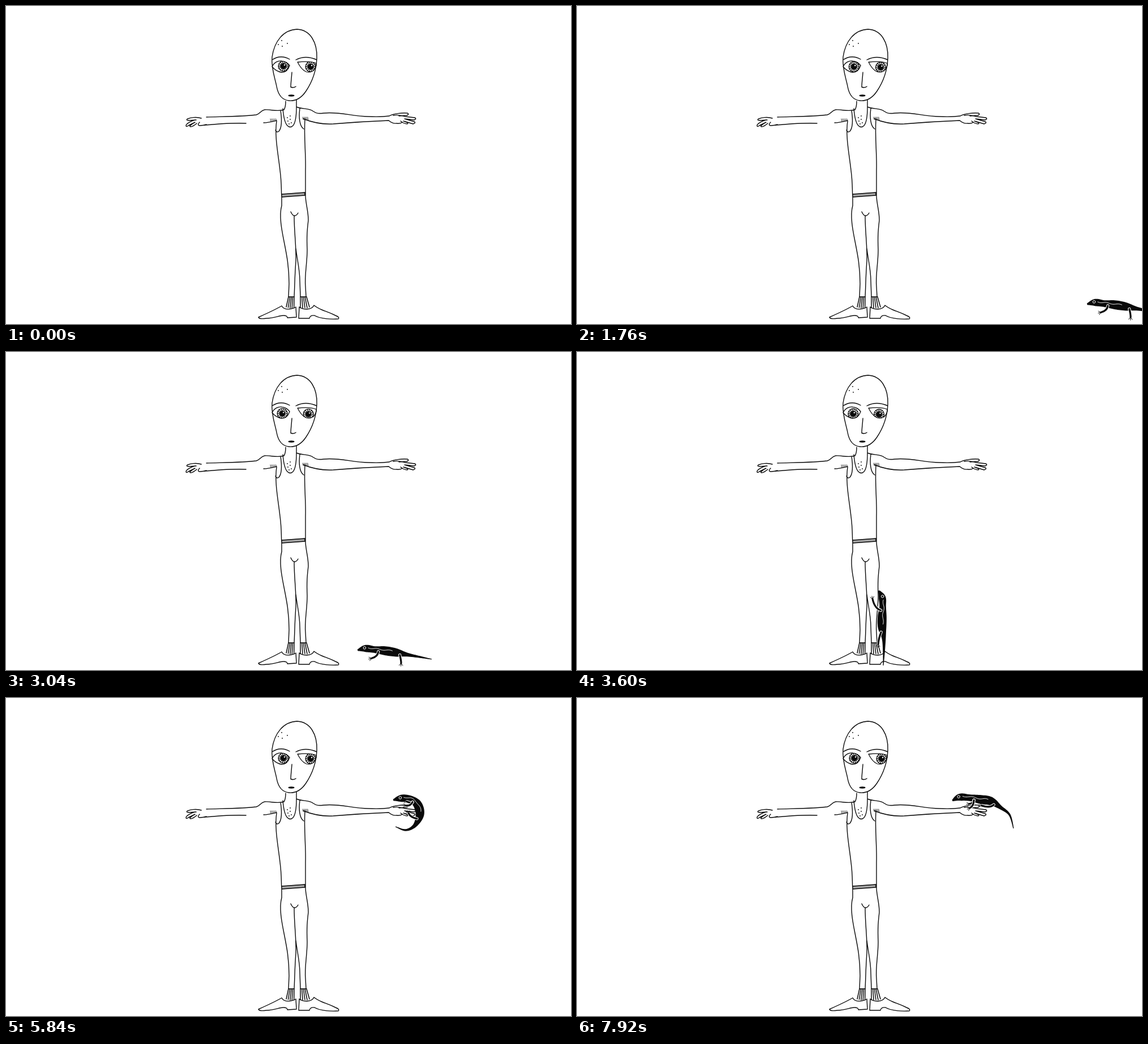
An HTML page with a canvas for the animation above (8 s loop, 998x561 px).

```html
<!DOCTYPE html>
<html lang="en">
<head>
<meta charset="utf-8">
<title>Lizard visit</title>
<style>
html, body { margin: 0; width: 100%; height: 100%; overflow: hidden; background: #fff; }
canvas { display: block; width: 100vw; height: 100vh; }
</style>
</head>
<body>
<canvas id="stage" width="998" height="561"></canvas>
<script>
const ctx = document.getElementById('stage').getContext('2d');
const LOOP = 8000, STEP = 80;
const INK = '#0a0a0a';

// ---- the man ----
const head = `M514 41C490 42 474 62 470 90C468 110 476 130 478 142C481 158 489 166 500 167
  C512 168 522 162 530 150C538 138 548 118 549 92C550 65 538 42 514 41Z
  M470 95Q485 85 501 94M512 95Q529 86 549 95
  M505 117C504 130 503 137 503 143Q508 145 512 142
  M494 168C494 175 493 180 491 183M513 166L513 178`;

const arms = `M491 183C478 187 468 182 457 183C450 184 449 190 442 192C420 195 385 195 354 196
  M478 202C470 204 463 206 455 206M424 207C400 206 372 208 342 211
  M345 198C336 195 326 197 321 199Q317 201 322 202L336 201
  M334 201C326 203 318 208 318 211Q318 214 322 211L334 205
  M334 205C328 208 322 213 326 213Q330 213 337 207M342 205Q337 210 342 211Q348 211 354 209
  M513 178C524 183 535 179 543 186C549 190 553 190 561 189C590 186 612 195 640 195Q662 196 677 194
  M525 199C540 205 560 209 578 208Q626 204 676 202`;

const rightHand = `M677 194C684 190 700 188 709 189Q713 191 708 193L694 194
  M684 193Q693 191 705 195L722 197Q726 199 721 201L704 199
  M704 199L721 204Q725 206 719 208L702 203M702 203Q712 206 709 208Q703 208 697 203
  M676 202Q683 208 690 207Q697 208 700 205`;

const torso = `M489 181C490 193 492 206 497 211Q502 216 507 211C512 205 513 193 513 178
  M485 184C487 198 488 214 482 221Q478 224 476 219
  M519 181C517 195 518 212 526 217
  M478 203C474 230 481 262 484 290C487 312 486 325 487 338
  M528 199C526 235 530 260 529 290L529 336
  M487 332L528 329L528 334L487 337Z`;

const legs = `M487 338L487 352C482 370 487 395 491 415C496 440 500 460 500 490L499 513
  M509 370C509 400 513 425 512 450C510 475 510 495 509 513
  M512 428C514 446 519 465 519 485L520 513
  M529 336C530 352 534 362 534 378C532 395 531 405 532 430C532 455 527 475 529 495L530 513
  M503 363Q506 370 510 370Q513 370 516 365`;

const shoes = `M446 549C455 545 475 536 487 529C491 537 503 536 512 531L513 549L497 550
  Q497 546 490 546C482 546 475 551 460 551Q447 553 446 549
  M518 531L517 551L536 551Q537 545 545 546C555 552 575 553 587 552
  Q590 549 582 546C570 540 565 539 558 536Q549 532 544 528C540 537 525 536 518 531`;

const lines = new Path2D([head, arms, rightHand, torso, legs, shoes].join(''));
const eyeL = new Path2D('M470 107C474 99 481 96 487 97Q496 98 501 105C498 114 493 117 487 117C480 116 474 112 470 107Z');
const eyeR = new Path2D('M515 99C524 98 538 97 548 101Q549 107 543 114Q537 118 530 116C523 113 518 105 515 99Z');

const dots = [481,68, 487,61, 497,66, 488,71, 497,197, 502,194, 498,203, 504,206, 500,208, 502,200];

function stroke(width, color, draw) {
  ctx.lineWidth = width;
  ctx.strokeStyle = color;
  ctx.beginPath();
  draw();
  ctx.stroke();
}

function seg(x1, y1, x2, y2) {
  ctx.moveTo(x1, y1);
  ctx.lineTo(x2, y2);
}

function disc(x, y, r, color) {
  ctx.fillStyle = color;
  ctx.beginPath();
  ctx.arc(x, y, r, 0, 7);
  ctx.fill();
}

function drawEye(shape, x, y) {
  ctx.save();
  ctx.clip(shape);
  stroke(1.3, INK, () => {
    ctx.arc(x, y, 9, 0, 7);
    for (let i = 0; i < 14; i++) {
      const c = Math.cos(i * Math.PI / 7), s = Math.sin(i * Math.PI / 7);
      seg(x + c * 5, y + s * 5, x + c * 9, y + s * 9);
    }
  });
  disc(x, y, 5.2, INK);
  disc(x + 2, y - 2, 1.2, '#fff');
  ctx.restore();
  ctx.lineWidth = 1.3;
  ctx.strokeStyle = INK;
  ctx.stroke(shape);
}

function drawMan(gaze) {
  ctx.lineWidth = 1.4;
  ctx.strokeStyle = INK;
  ctx.stroke(lines);
  drawEye(eyeL, 490 - gaze * 2.2, 106 + gaze * 3);
  drawEye(eyeR, 538 - gaze * 4.5, 107 + gaze * 3);
  for (let i = 0; i < dots.length; i += 2) disc(dots[i], dots[i + 1], 0.9, INK);

  ctx.fillStyle = INK;
  ctx.beginPath();
  ctx.ellipse(504, 158, 5.5, 1.7, 0, 0, 7);
  ctx.fill();

  stroke(0.8, INK, () => {
    for (let x = 489; x < 528; x += 2.2) {
      const y = 332 - (x - 487) * 0.073;
      seg(x, y, x, y + 5);
    }
    for (let i = 0; i < 5; i++) {
      seg(467 + i * 2.4, 199, 468 + i * 2.4, 204 - i * 0.3);
      seg(524 + i * 2.2, 196, 525 + i * 2.2, 200 + i * 0.4);
    }
  });
  stroke(1.5, INK, () => {
    seg(499, 513, 509, 513);
    seg(520, 513, 531, 513);
    for (let i = 0; i < 5; i++) {
      seg(499 + i * 2.5, 513, 495 + i * 3.4, 531 + Math.min(i, 2));
      seg(520 + i * 2.7, 513, 520 + i * 4, 531 + (i < 4 ? 1.5 : 0));
    }
  });
}

// ---- the lizard: spine from nose to tail tip, feet as forward/side offsets ----
const pose = (t, spine, feet, pair = 0) => ({ t, spine, feet, pair });

const runHigh = pose(0, [0,526, 14,522, 30,523, 48,524, 68,526, 88,526, 110,527, 132,528], [18, 12, -13, 15]);
const runLow = pose(0, [0,526, 14,523, 30,525, 48,527, 67,530, 88,534, 110,538, 131,542], [11, 16, -5, 17]);

const climb = [
  pose(3480, [537,468, 538,483, 541,500, 548,516, 562,525, 582,528, 606,531, 628,534], [16, 16, -8, 15]),
  pose(3600, [533,421, 539,433, 540,449, 539,467, 539,486, 542,506, 542,530, 541,553], [19, 19, -20, 12]),
  pose(4320, [538,308, 541,321, 541,337, 539,356, 540,375, 540,397, 537,420, 536,441], [22, 18, -10, 16]),
  pose(4720, [574,245, 563,260, 552,274, 547,291, 544,309, 538,329, 533,355, 535,380], [28, 18, 3, 18], 1)
];

const perch = [
  pose(5120, [711,218, 700,226, 688,235, 673,244, 655,251, 634,258, 612,266, 590,276], [20, 12, -14, 12], 1),
  pose(5360, [735,196, 738,211, 733,226, 724,240, 712,253, 700,268, 690,282, 682,296], [10, 17, 4, 17]),
  pose(5600, [712,173, 725,178, 735,191, 736,207, 732,222, 722,238, 712,250, 702,262], [8, 16, 4, 18]),
  pose(5840, [684,180, 698,177, 714,178, 727,188, 731,206, 722,225, 706,233, 688,227], [7, 15, 3, 20], 1),
  pose(6080, [663,181, 676,175, 694,176, 713,179, 731,182, 748,193, 764,206, 771,230], [5, 18, 17, 16], 1)
];

const mix = (a, b, k) => a + (b - a) * k;
const mixList = (a, b, k) => a.map((v, i) => mix(v, b[i], k));
const blend = (a, b, k) => pose(0, mixList(a.spine, b.spine, k), mixList(a.feet, b.feet, k), mix(a.pair, b.pair, k));

function run(t) {
  const low = 0.5 + 0.5 * Math.cos((t - 1760) / 256 * 2 * Math.PI);
  const x = 901 - (t - 1760) * 140 / 640;
  const p = blend(runHigh, runLow, low);
  p.spine = p.spine.map((v, i) => i % 2 ? v : v + x);
  p.t = t;
  return p;
}

const keys = [run(3360), ...climb, ...perch];

function lizardAt(t) {
  if (t <= 3360) return run(t);
  const i = keys.findIndex(k => k.t >= t);
  if (i > 0) return blend(keys[i - 1], keys[i], (t - keys[i - 1].t) / (keys[i].t - keys[i - 1].t));
  const last = blend(perch[4], perch[4], 0);
  const wag = Math.sin((t - 7920) / 1280 * 2 * Math.PI);
  last.spine[12] -= wag;
  last.spine[14] -= wag * 2;
  return last;
}

function spline(get, u) {
  const i = Math.min(6, Math.floor(u)), f = u - i;
  const a = get(Math.max(0, i - 1)), b = get(i), c = get(i + 1), d = get(Math.min(7, i + 2));
  return b + 0.5 * f * (c - a + f * (2 * a - 5 * b + 4 * c - d + f * (3 * (b - c) + d - a)));
}

const girth = [1.3, 6.2, 5.8, 7.8, 7.4, 3.4, 1.7, 0.6];

function drawLizard({ spine, feet, pair }) {
  const at = u => [spline(i => spine[i * 2], u), spline(i => spine[i * 2 + 1], u)];
  // Point at spine position u, moved forward and to the belly side.
  const place = (u, fwd, side) => {
    const [x, y] = at(u), a = at(Math.max(0, u - 0.1)), b = at(Math.min(7, u + 0.1));
    const len = Math.hypot(a[0] - b[0], a[1] - b[1]) || 1;
    const tx = (a[0] - b[0]) / len, ty = (a[1] - b[1]) / len;
    return [x + tx * fwd + ty * side, y + ty * fwd - tx * side];
  };
  const trace = (from, to, side) => {
    const n = Math.round(Math.abs(to - from) * 8);
    for (let i = 0; i <= n; i++) {
      const u = mix(from, to, i / n);
      ctx.lineTo(...place(u, 0, side(u)));
    }
  };
  const width = u => spline(i => girth[i], u);

  const leg = (u, fwd, side) => {
    const hip = place(u, 0, 3), knee = place(u, fwd * 0.3 - 3, side * 0.75), foot = place(u, fwd, side);
    const limb = () => { ctx.moveTo(...hip); ctx.quadraticCurveTo(...knee, ...foot); };
    stroke(5.2, '#fff', limb);
    stroke(3.2, INK, limb);
    const dir = Math.atan2(foot[1] - knee[1], foot[0] - knee[0]);
    stroke(1, INK, () => {
      for (const turn of [-0.7, 0, 0.7])
        seg(...foot, foot[0] + 5 * Math.cos(dir + turn), foot[1] + 5 * Math.sin(dir + turn));
    });
  };

  ctx.fillStyle = INK;
  ctx.beginPath();
  trace(0, 7, width);
  trace(7, 0, u => -width(u));
  ctx.fill();

  if (pair > 0.5) leg(2.4, feet[0] + 2, feet[1] - 7);
  leg(2.4, feet[0], feet[1]);
  leg(4.4, feet[2], feet[3]);

  stroke(0.9, '#fff', () => trace(1.3, 3.7, u => -1.5 + Math.sin(u * 5)));
  const [ex, ey] = place(0.9, 0, -1.2);
  stroke(1, '#fff', () => ctx.arc(ex, ey, 2.3, 0, 7));
}

// ---- gaze: 0 looks to the side, 1 looks down ----
const gazeKeys = [[0, 0], [800, 0], [1760, 0.35], [2400, 0.65], [3440, 1], [5120, 1], [5760, 0], [LOOP, 0]];

function gazeAt(t) {
  const i = gazeKeys.findIndex(k => k[0] > t);
  const [t0, a] = gazeKeys[i - 1], [t1, b] = gazeKeys[i];
  return mix(a, b, (t - t0) / (t1 - t0));
}

function render(now) {
  const t = Math.floor((now % LOOP) / STEP) * STEP;
  ctx.fillStyle = '#fff';
  ctx.fillRect(0, 0, 998, 561);
  ctx.lineCap = ctx.lineJoin = 'round';
  drawMan(gazeAt(t));
  if (t >= 800) drawLizard(lizardAt(t));
}

let start = null;
function tick(now) {
  if (start === null) start = now;
  render(now - start);
  requestAnimationFrame(tick);
}
render(0);
requestAnimationFrame(tick);
</script>
</body>
</html>
```
